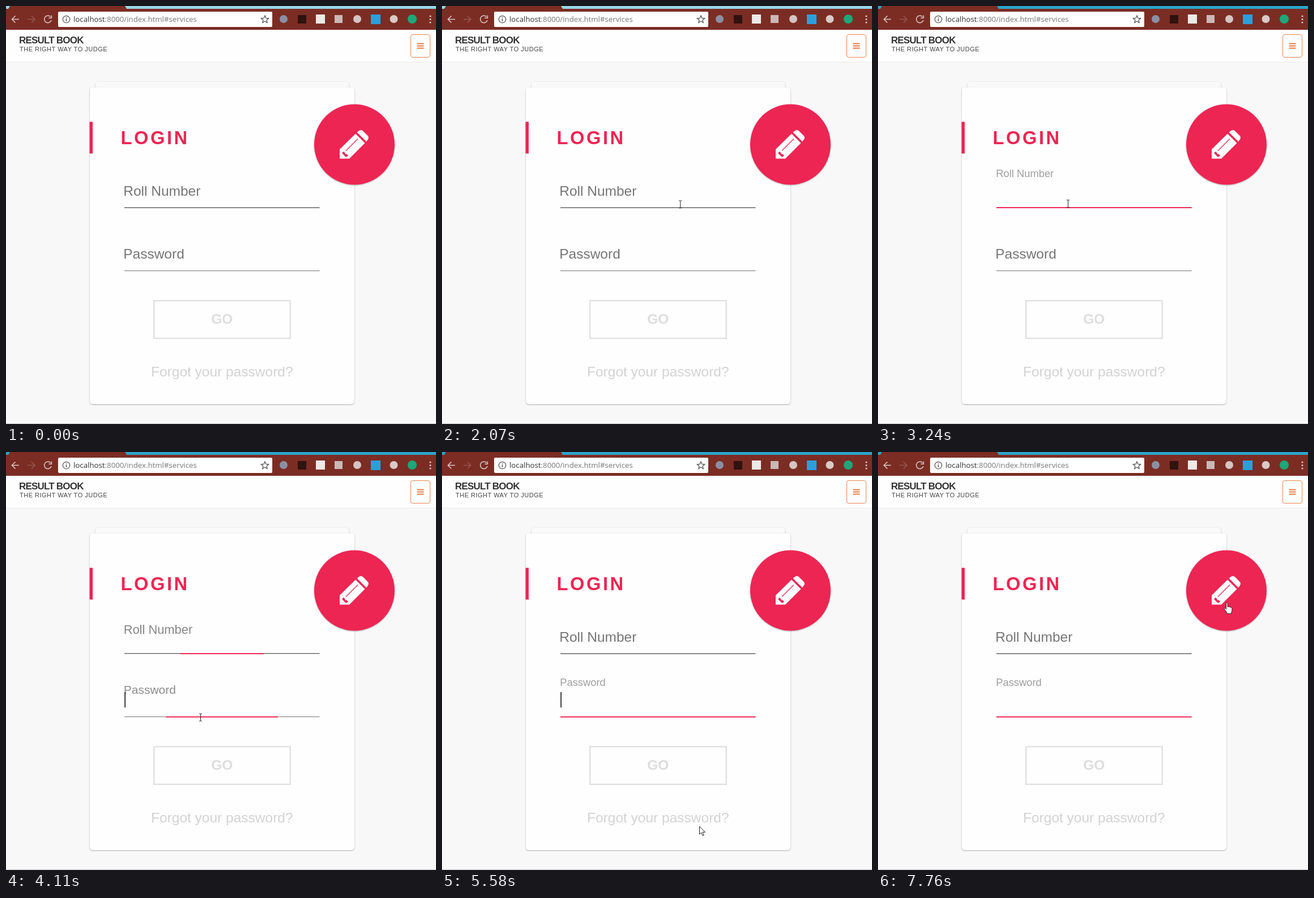
Animation of 759 by 738 pixels, one loop 8000 ms. Source, as an HTML page:

```html
<!DOCTYPE html>
<html lang="en">
<head>
<meta charset="utf-8">
<title>Login form</title>
<style>
  html, body { margin: 0; width: 100%; height: 100%; overflow: hidden; background: #f8f8f8; }
  svg { display: block; width: 759px; height: 738px; font-family: "Liberation Sans", Arial, sans-serif; }
  .field { font-size: 24.5px; }
  .card { filter: drop-shadow(0 1px 1px rgba(0,0,0,.3)); }
  .line { fill: none; stroke-width: 1.6; }
</style>
</head>
<body>
<svg viewBox="0 0 759 738">
  <!-- browser bar -->
  <rect id="strip" width="759" height="6"/>
  <path d="M0 42V5H4L7 0H210L213 5H759V42Z" fill="#7b2d24"/>
  <rect x="92" y="10" width="378" height="27" rx="2" fill="#fff"/>
  <g class="line" stroke="#d9c4c1">
    <path d="M23 23.500H11M16.500 17.500L10.500 23.500L16.500 29.500"/>
    <path d="M38 23.500H50M45 17.500L51 23.500L45 29.500" stroke="#96574f"/>
    <path d="M78.500 19A6.300 6.300 0 1 0 80 25M80.300 16.500V21.300H75.300"/>
  </g>
  <g class="line" stroke="#555">
    <circle cx="106.500" cy="23.500" r="6.200" stroke-width="1.300"/>
    <path d="M106.500 22.500V27M106.500 19.700V21.200"/>
    <path d="M457 17L458.900 21.400L463.600 21.800L460 24.900L461.100 29.500L457 27L452.900 29.500L454 24.900L450.400 21.800L455.100 21.400Z" stroke-width="1.300"/>
  </g>
  <text x="119" y="28" font-size="13.250" font-family="Open Sans, Noto Sans, sans-serif" fill="#333">localhost<tspan fill="#777">:8000/index.html#services</tspan></text>
  <circle cx="490" cy="23" r="7" fill="#8b8fa3"/>
  <rect x="515" y="16" width="15" height="15" fill="#30120f"/>
  <rect x="547" y="15" width="16" height="16" fill="#eee9e7"/>
  <rect x="580" y="16" width="14" height="14" fill="#cbb8b5"/>
  <circle cx="620" cy="23" r="7" fill="#d3c5c3"/>
  <rect x="644" y="15" width="17" height="17" fill="#2b9fdc"/>
  <circle cx="684.500" cy="23" r="7" fill="#d9cac8"/>
  <circle cx="717" cy="23" r="8" fill="#1fa67a"/>
  <g fill="#d9c4c1">
    <circle cx="749" cy="18" r="1.600"/><circle cx="749" cy="23.500" r="1.600"/><circle cx="749" cy="29" r="1.600"/>
  </g>

  <!-- page header -->
  <rect y="42" width="759" height="57" fill="#fefefe"/>
  <rect y="98.500" width="759" height="1" fill="#ebebeb"/>
  <text x="23" y="66" font-size="17" font-weight="bold" letter-spacing="-.8" fill="#333">RESULT BOOK</text>
  <text x="24" y="80" font-size="11" letter-spacing=".5" fill="#444">THE RIGHT WAY TO JUDGE</text>
  <rect x="714.500" y="50.500" width="34" height="40" rx="3.500" fill="none" stroke="#e8854f"/>
  <path d="M725.500 66.500H737.500M725.500 70.500H737.500M725.500 74.500H737.500" stroke="#e67a40" stroke-width="2"/>
  <rect y="737" width="759" height="1" fill="#c4c4c4"/>

  <!-- cards -->
  <rect class="card" x="158" y="133.500" width="447.500" height="30" rx="5" fill="#fafafa"/>
  <rect class="card" x="148" y="143.500" width="467" height="559.500" rx="5" fill="#fefefe"/>
  <rect x="147.500" y="204.500" width="5.500" height="56" fill="#ed2553"/>
  <text x="202.600" y="244" font-size="32.700" font-weight="bold" letter-spacing="3.500" fill="#ed2553">LOGIN</text>
  <circle class="card" cx="615" cy="244.500" r="71" fill="#ed2553"/>
  <g fill="#fff">
    <path d="M589 269.500V253L617 225.500L633.500 242L606 269.500Z"/>
    <path d="M619.500 223L622.500 220.500Q626.500 217.500 630 220.500L638.500 229Q641.500 232.500 638.500 236L636 239.500Z"/>
  </g>
  <path d="M593 259.500L596 257L598.500 259.500V261.500H601.500L604 264L601 266.500L598.500 265.500Z" fill="#ed2553"/>
  <path d="M600 255.500L621 234.500" stroke="#ed2553" stroke-width="1.300"/>

  <!-- form -->
  <rect id="rollLine" x="209" y="355.200" width="344.500"/>
  <rect x="209" y="467" width="344.500" height="1" fill="#757575"/>
  <rect id="rollBar" y="355" height="2" fill="#ed2553"/>
  <rect id="passBar" y="466.700" height="2" fill="#ed2553"/>
  <text id="roll" class="field">Roll Number</text>
  <text id="pass" class="field">Password</text>
  <rect id="caret" x="209.300" width="1.600" height="27" fill="#111"/>
  <rect id="box" x="261.200" y="520.200" width="240.600" height="66.600" fill="none" stroke-width="2.500"/>
  <text id="go" class="field" x="381.300" y="561" font-weight="bold" text-anchor="middle">GO</text>
  <text class="field" x="381.300" y="654" text-anchor="middle" fill="#d3d3d3">Forgot your password?</text>

  <path id="mouse" fill="#fff" stroke="#222" stroke-linejoin="round"/>
</svg>
<script>
const $ = id => document.getElementById(id);
const set = (id, attrs) => { for (const k in attrs) $(id).setAttribute(k, attrs[k]); };
const lerp = (a, b, p) => a + (b - a) * p;
const clamp = x => Math.min(1, Math.max(0, x));
const ease = (t, start, ms) => 1 - (1 - clamp((t - start) / ms)) ** 2.1;
const mix = (a, b, p) => `rgb(${a.map((v, i) => Math.round(lerp(v, b[i], p)))})`;

const LOOP = 8000, BLINK = 528, ROLL_CLICK = 2710, PASS_CLICK = 4040;
const PINK = [237, 37, 83];

// The screen refreshes in bursts: first time, last time, count.
const ticks = [[0, 0, 1], [690, 1150, 7], [1990, 2140, 3], [2450, 2530, 2], [2690, 2930, 4],
  [3240, 3240, 1], [3640, 3870, 4], [4030, 4260, 4], [4570, 4870, 5], [5100, 5100, 1],
  [5270, 5650, 6], [5900, 6200, 5], [6660, 6980, 5], [7210, 7210, 1], [7360, 7760, 6]]
  .flatMap(([a, b, n]) => Array.from({length: n}, (_, i) => lerp(a, b, i / (n - 1 || 1))));

// Pointer moves: start, end, x, y.
const moves = [[690, 1150, 620, 254], [1915, 2140, 351, 384], [2370, 2530, 335.5, 349],
  [3560, 3870, 343.5, 468.5], [4495, 4720, 440.5, 552.5], [5195, 5570, 454.5, 661],
  [5825, 6200, 492.5, 638.5], [6585, 6980, 681.5, 384.5], [7285, 7760, 615.5, 266.5]];

const shapes = {
  arrow: 'M0 0V14L3.200 11L5.500 16.300L7.700 15.300L5.400 10.200H10Z',
  beam: 'M-2.500-6.500H-.5L0-6L.5-6.500H2.500M0-6V6M-2.500 6.500H-.5L0 6L.5 6.500H2.500',
  hand: 'M-1 1.200C-1-.6 1.600-.6 1.600 1.200V7C2.800 6 4.400 6.400 4.600 7.400C5.800 6.600 7 7 7.200 8.200' +
    'C8.600 7.600 9.400 8.400 9.400 9.600V13C9.400 15 8 16 8 19H.8C.6 16-3.200 13-4.200 10.600C-4.600 9-2.600 8.600-1.400 10.400L-1 11Z'
};

function pointer(t) {
  let x = 649, y = 706;
  for (const [a, b, toX, toY] of moves) {
    const p = clamp((t - a) / (b - a)), e = p * p * (3 - 2 * p);
    x = lerp(x, toX, e);
    y = lerp(y, toY, e);
  }
  return [x, y];
}

function shapeAt(x, y) {
  const within = (l, t, r, b) => x >= l && x <= r && y >= t && y <= b;
  if (Math.hypot(x - 615, y - 244.5) < 71 || within(260, 519, 503, 588) || within(256, 632, 506, 658)) return 'hand';
  return within(209, 297, 553, 357) || within(209, 408, 553, 470) ? 'beam' : 'arrow';
}

function drawField(name, baseline, focus) {
  set(name, {
    transform: `translate(${lerp(207.2, 208.2, focus)} ${baseline - 33 * focus}) scale(${1 - .25 * focus})`,
    fill: mix([117, 117, 117], [157, 157, 157], focus)
  });
  const w = 344.5 * focus;
  set(name + 'Bar', {x: 381.25 - w / 2, width: w});
}

function draw(t) {
  const toPass = ease(t, PASS_CLICK, 200);
  drawField('roll', 335, ease(t, ROLL_CLICK, 200) - toPass);
  drawField('pass', 446, toPass);

  const hovered = t >= 2530 && t < 4180;
  set('rollLine', {height: hovered ? 1.1 : 1.7, fill: hovered ? '#3c3c3c' : '#757575'});
  set('strip', {fill: t < 2690 ? '#96d8e6' : '#2ba5c7'});

  const onPass = t >= PASS_CLICK, click = onPass ? PASS_CLICK : ROLL_CLICK;
  const lit = t >= click && Math.floor((t - click) / BLINK) % 2 === 0;
  set('caret', {y: onPass ? 424 : 313, opacity: lit ? 1 : 0});

  const hot = ease(t, 4650, 300) - ease(t, 5300, 300);
  set('box', {stroke: mix([226, 226, 226], PINK, hot)});
  set('go', {fill: mix([221, 221, 221], PINK, hot)});

  const [x, y] = pointer(t);
  set('mouse', {d: shapes[shapeAt(x, y)], transform: `translate(${x} ${y})`, opacity: t < 690 ? 0 : 1});
}

function frame() {
  const now = performance.now() % LOOP;
  draw(ticks.findLast(tick => tick <= now));
  requestAnimationFrame(frame);
}
frame();
</script>
</body>
</html>
```
